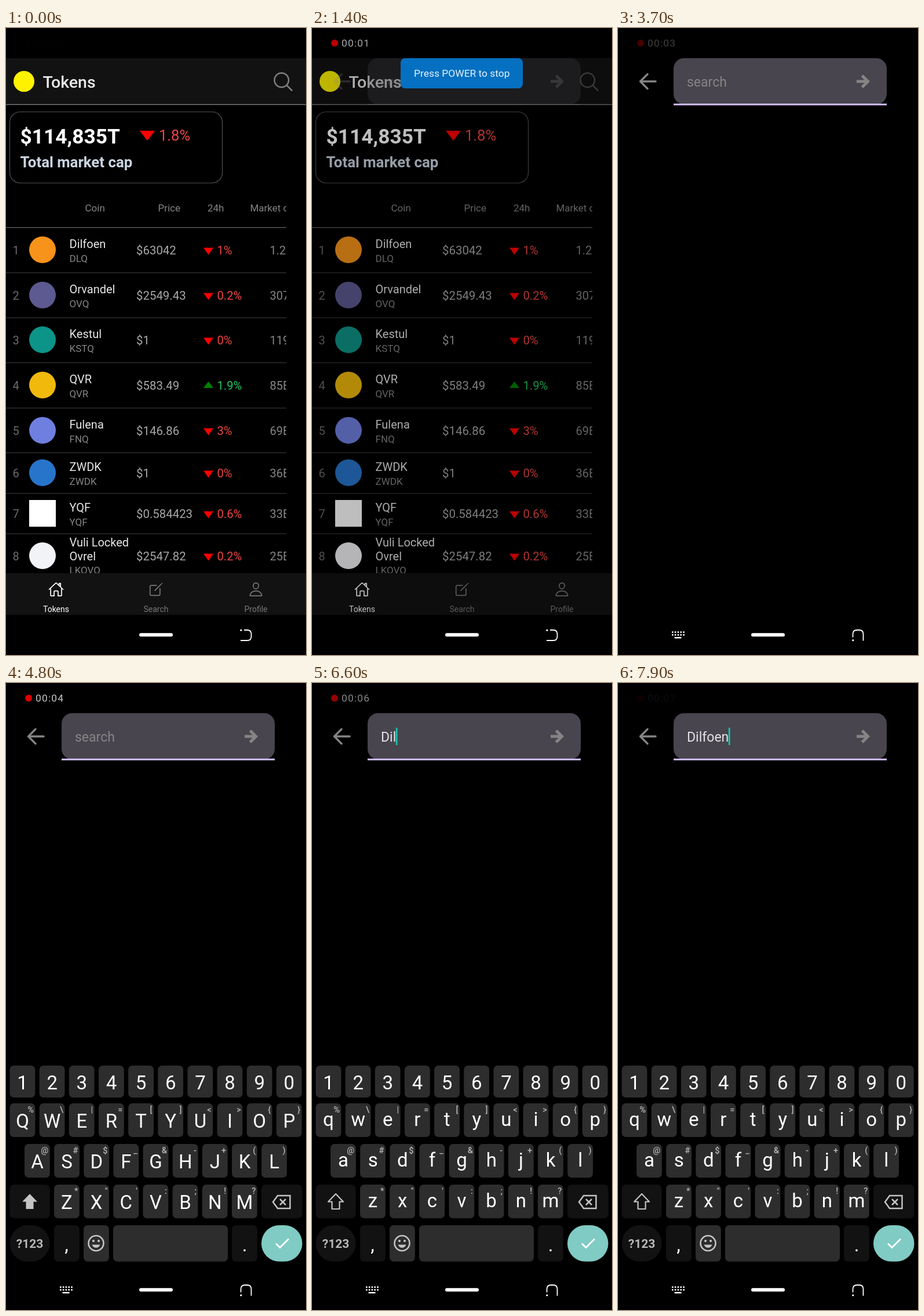
Animation, 518 px wide and 1080 px high, one loop 8 s. Source, as an HTML page with a canvas:

```html
<!DOCTYPE html>
<html lang="en">
<head>
<meta charset="utf-8">
<title>Token tracker</title>
<style>
html, body { margin: 0; width: 100%; height: 100%; overflow: hidden; background: #000; }
canvas { display: block; width: 518px; height: 1080px; }
</style>
</head>
<body>
<canvas id="stage"></canvas>
<script>
const W = 518, H = 1080, LOOP = 8000;
const canvas = document.getElementById('stage');
const ctx = canvas.getContext('2d');
const scale = window.devicePixelRatio || 1;
canvas.width = W * scale;
canvas.height = H * scale;

const RED = '#ff0000', BAR = '#121212', KEY = '#2d2d2d', KEY_DOWN = '#4a4a4a', MUTED = '#858585';
const TABLE_RIGHT = 484;
const WORD = 'Dilfoen';
const TYPED_AT = [6000, 6300, 6550, 7000, 7200, 7350, 7550];
const LOWER_AT = 6050;

// name, symbol, price, change, market cap, row centre, icon colour
const COINS = [
  [[WORD], 'DLQ', '$63042', '-1%', '1.2T', 383, '#f7931a'],
  [['Orvandel'], 'OVQ', '$2549.43', '-0.2%', '307B', 461, '#5c5a90'],
  [['Kestul'], 'KSTQ', '$1', '-0%', '119B', 538, '#0d9488'],
  [['QVR'], 'QVR', '$583.49', '+1.9%', '85B', 616, '#f0b90b'],
  [['Fulena'], 'FNQ', '$146.86', '-3%', '69B', 694, '#6f7fe0'],
  [['ZWDK'], 'ZWDK', '$1', '-0%', '36B', 767, '#2775ca'],
  [['YQF'], 'YQF', '$0.584423', '-0.6%', '33B', 837, '#ffffff'],
  [['Vuli Locked', 'Ovrel'], 'LKOVQ', '$2547.82', '-0.2%', '25B', 910, '#f2f3f6']
];
const KEY_ROWS = [
  { keys: '1234567890', hints: '', x: 6.5, y: 659, h: 55 },
  { keys: 'QWERTYUIOP', hints: '%\\|=[]<>{}', x: 6.5, y: 724, h: 58 },
  { keys: 'ASDFGHJKL', hints: '@#$_&-+()', x: 32, y: 794, h: 58 },
  { keys: 'ZXCVBNM', hints: '*"\':;!?', x: 83, y: 864, h: 58 }
];
// outlines on a 512 grid
const ICONS = {
  home: 'M80 212V448Q80 464 96 464H192V328Q192 304 216 304H296Q320 304 320 328V464H416Q432 464 432 448V212' +
    'M480 256L267 52Q256 44 245 52L32 256M400 179V64H352V133',
  edit: 'M384 224V408Q384 448 344 448H104Q64 448 64 408V168Q64 128 104 128H271M222 290L411 101M438 74L449 64',
  person: 'M344 144C340 197 300 240 256 240S172 197 168 144C164 89 203 48 256 48S348 90 344 144Z' +
    'M256 304C169 304 81 352 64 443Q64 464 80 464H432Q448 464 448 443C431 352 343 304 256 304Z',
  lens: 'M378 221A157 157 0 1 1 64 221A157 157 0 1 1 378 221M338 338L448 448'
};

const ramp = (t, from, to) => Math.min(1, Math.max(0, (t - from) / (to - from)));

function text(str, x, y, size, color, weight = 400, align = 'left', spacing = 0) {
  ctx.font = `${weight} ${size}px Roboto, sans-serif`;
  ctx.letterSpacing = spacing + 'px';
  ctx.textAlign = align;
  ctx.fillStyle = color;
  ctx.fillText(str, x, y);
}

function rect(x, y, w, h, color) {
  ctx.fillStyle = color;
  ctx.fillRect(x, y, w, h);
}

function round(x, y, w, h, r, color, line = 0) {
  ctx.beginPath();
  ctx.roundRect(x, y, w, h, r);
  paint(color, line);
}

function circle(x, y, r, color, line = 0) {
  ctx.beginPath();
  ctx.arc(x, y, r, 0, Math.PI * 2);
  paint(color, line);
}

// line 0 means filled
function paint(color, line, path) {
  const args = path ? [path] : [];
  ctx.strokeStyle = ctx.fillStyle = color;
  ctx.lineWidth = line;
  if (line) ctx.stroke(...args);
  else ctx.fill(...args);
}

function shape(d, color, line = 0, cap = 'butt') {
  ctx.lineCap = cap;
  ctx.lineJoin = cap === 'round' ? 'round' : 'miter';
  paint(color, line, new Path2D(d));
}

function icon(name, x, y, size, color) {
  ctx.save();
  ctx.translate(x - size / 2, y - size / 2);
  ctx.scale(size / 512, size / 512);
  shape(ICONS[name], color, 32, 'round');
  ctx.restore();
}

function layer(alpha, draw) {
  if (alpha <= 0) return;
  ctx.save();
  ctx.globalAlpha = alpha;
  draw();
  ctx.restore();
}

function clipped(w, h, draw) {
  ctx.save();
  ctx.beginPath();
  ctx.rect(0, 0, w, h);
  ctx.clip();
  draw();
  ctx.restore();
}

function triangle(x, y, w, h, up) {
  const base = up ? y + h : y, tip = up ? y : y + h;
  shape(`M${x} ${base}h${w}L${x + w / 2} ${tip}Z`, up ? '#008000' : RED);
}

function coinRow([names, symbol, price, change, cap, y, color], i) {
  const up = change[0] === '+', two = names.length > 1;
  text(i + 1, 11.5, y + 7, 20, '#6b6b6b');
  if (symbol === 'YQF') rect(40, y - 24, 46, 46, color);
  else circle(63, y - 1, 23, color);
  names.forEach((n, k) => text(n, 109.5, y + (two ? -17 : -4) + k * 24, 20, '#e8e8e8'));
  text(symbol, 109.5, y + (two ? 30 : 19.5), 17, '#858585');
  text(price, 225, y + 7, 20.4, '#a8a8a8');
  triangle(341, y - (up ? 7 : 4.5), 17, up ? 11 : 12, up);
  text(change.slice(1), 364.5, y + 7, 20.2, up ? '#22c55e' : '#ef4444');
  text(cap, 455.5, y + 7, 20, '#858585');
}

function coinTable() {
  text('Coin', 136.5, 315.5, 17, '#858585');
  text('Price', 262.5, 315.5, 17, '#858585');
  text('24h', 348, 315.5, 17, '#858585');
  text('Market cap', 421.5, 315.5, 17, '#858585');
  rect(0, 343, W, 1.3, '#606060');
  for (const y of [421, 498.5, 576, 654, 731, 801, 870.5]) rect(0, y, W, 1.2, '#353535');
  COINS.forEach(coinRow);
}

function tab(name, label, x, color) {
  icon(name, x, 967, 27.4, color);
  text(label, x, 1006, 14, color, 400, 'center');
}

function tokensScreen(t) {
  rect(0, 0, W, 1012, '#000');
  rect(0, 52, W, 79, BAR);
  rect(0, 131, W, 1.5, '#777');
  circle(31, 92, 18, '#fff200');
  text('Tokens', 63.5, 103, 28.5, '#e8e8e8', 500);
  icon('lens', 478.5, 92.5, 40, t < 850 ? '#808080' : '#4a4a4a');

  round(6.5, 144.5, 367, 122.5, 18, '#505050', 1.2);
  text('$114,835T', 24.5, 199, 35.3, '#fff', 700);
  triangle(231, 177, 26, 17);
  text('1.8%', 264, 194, 25.5, '#ef4444');
  text('Total market cap', 24.5, 240, 25.8, '#cbd5e1', 700);

  clipped(TABLE_RIGHT, 939, coinTable);

  rect(0, 939, W, 72, BAR);
  tab('home', 'Tokens', 86.5, '#fff');
  tab('edit', 'Search', 259, '#777');
  tab('person', 'Profile', 431.5, '#777');
}

function searchScreen(t) {
  rect(0, 0, W, 1012, '#000');
  shape('M65 92H39M51 79.5L38.5 92L51 104.5', MUTED, 3.4, 'round');
  round(96, 52, 368, 79.5, 18, '#48454e');
  if (t < 2600) rect(96, 131, 368, 1.3, '#938f99');
  else rect(96, 130.2, 368, 3, '#d0bcff');
  shape('M412 92H431M421.5 82L431.5 92L421.5 102', MUTED, 5);

  const typed = WORD.slice(0, TYPED_AT.filter(at => t >= at).length);
  if (!typed) return text('search', 119, 101, 23, MUTED);
  text(typed, 119, 101, 23, '#e6e1e5');
  rect(118.5 + ctx.measureText(typed).width, 77, 2.8, 30, '#14c4ad');
}

function keyboard(t) {
  const lower = t >= LOWER_AT;
  const hit = TYPED_AT.findIndex(at => t >= at - 120 && t < at - 20);
  const pressed = hit < 0 ? '' : WORD[hit].toUpperCase();
  const dark = (x, y, w, h, r) => round(x, y, w, h, r, BAR);

  KEY_ROWS.forEach(({ keys, hints, x, y, h }) => {
    [...keys].forEach((key, i) => {
      const left = x + i * 51.15;
      round(left, y, 43.8, h, 7, key === pressed ? KEY_DOWN : KEY);
      const base = hints ? y + (lower ? 39 : 42) : y + 41;
      text(lower ? key.toLowerCase() : key, left + 22, base, 33, '#fff', 400, 'center');
      if (hints) text(hints[i], left + 41.3, y + 16, 14.5, '#b8b8b8', 500, 'right');
    });
  });

  dark(6.5, 864, 69, 58, 7);
  const arrow = 'M41 880L54 893.5H47.5V906H34.5V893.5H28Z';
  if (lower) shape(arrow, '#c4c4c4', 2.2, 'round');
  else shape(arrow, '#c4c4c4');
  dark(441, 864, 70.5, 58, 7);
  shape('M461 894L469 883H490.5V905H469ZM473 889L483 899M483 889L473 899', '#c4c4c4', 2.5);

  dark(6.5, 934, 69, 62.5, 31);
  text('?123', 41, 973, 21, '#b8b8b8', 700, 'center');
  dark(83, 934, 43.8, 62.5, 7);
  text(',', 104.5, 979, 33, '#fff', 400, 'center');
  round(134, 934, 43.8, 62.5, 7, KEY);
  circle(155.5, 965, 13, '#c4c4c4', 2.6);
  circle(151, 961, 2.1, '#c4c4c4');
  circle(160, 961, 2.1, '#c4c4c4');
  shape('M148.5 967.5H162.5C160 974.5 151 974.5 148.5 967.5Z', '#c4c4c4');
  round(185, 934, 198, 62.5, 7, KEY);
  dark(390, 934, 43.8, 62.5, 7);
  text('.', 412, 979, 33, '#fff', 400, 'center');
  round(441, 934, 70.5, 62.5, 31, '#80cbc4');
  shape('M466 965.5L473 972.5L488 957.5', '#fff', 2.8);
}

function navBar(t) {
  rect(0, 1011, W, 69, '#000');
  round(230, 1042.3, 58, 6, 3, '#fff');
  const imeMode = t >= 3400;
  ctx.save();
  ctx.translate(414.5, 1046);
  if (imeMode) ctx.rotate(-Math.PI / 2);
  shape('M-3.5 -9H2Q9 -9 9 -2V2Q9 9 2 9H-9.5', '#fff', 1.8);
  circle(-8.7, -8.7, 1.6, '#fff');
  ctx.restore();
  if (!imeMode) return;
  for (let i = 0; i < 10; i++) {
    rect(93 + (i % 5) * 4.8, i < 5 ? 1039.3 : 1044, 2.6, 2.6, '#fff');
  }
  rect(97.5, 1049, 12, 2.4, '#fff');
}

function toast() {
  round(153, 52, 211, 52, 8, '#0570c1');
  text('Press POWER to stop', 258.8, 84, 17.4, '#e8f2fa', 400, 'center');
}

function recorder(t) {
  circle(39, 26, 6, RED);
  text('00:0' + Math.floor(t / 1000), 51, 32.3, 17.4, '#e8e8e8', 400, 'left', 1.2);
}

function draw(t) {
  ctx.setTransform(scale, 0, 0, scale, 0, 0);
  rect(0, 0, W, H, '#000');
  const swap = ramp(t, 1350, 1550);
  if (swap < 1) tokensScreen(t);
  layer(swap, () => searchScreen(t));
  layer(ramp(t, 4600, 4750), () => keyboard(t));
  navBar(t);
  layer(ramp(t, 300, 500) * (1 - ramp(t, 1600, 1800)), toast);
  layer((1 - Math.cos(Math.PI * (t - 50) / 1000)) / 2, () => recorder(t));
}

const start = performance.now();
function tick() {
  draw((performance.now() - start) % LOOP);
  requestAnimationFrame(tick);
}
tick();
</script>
</body>
</html>
```
